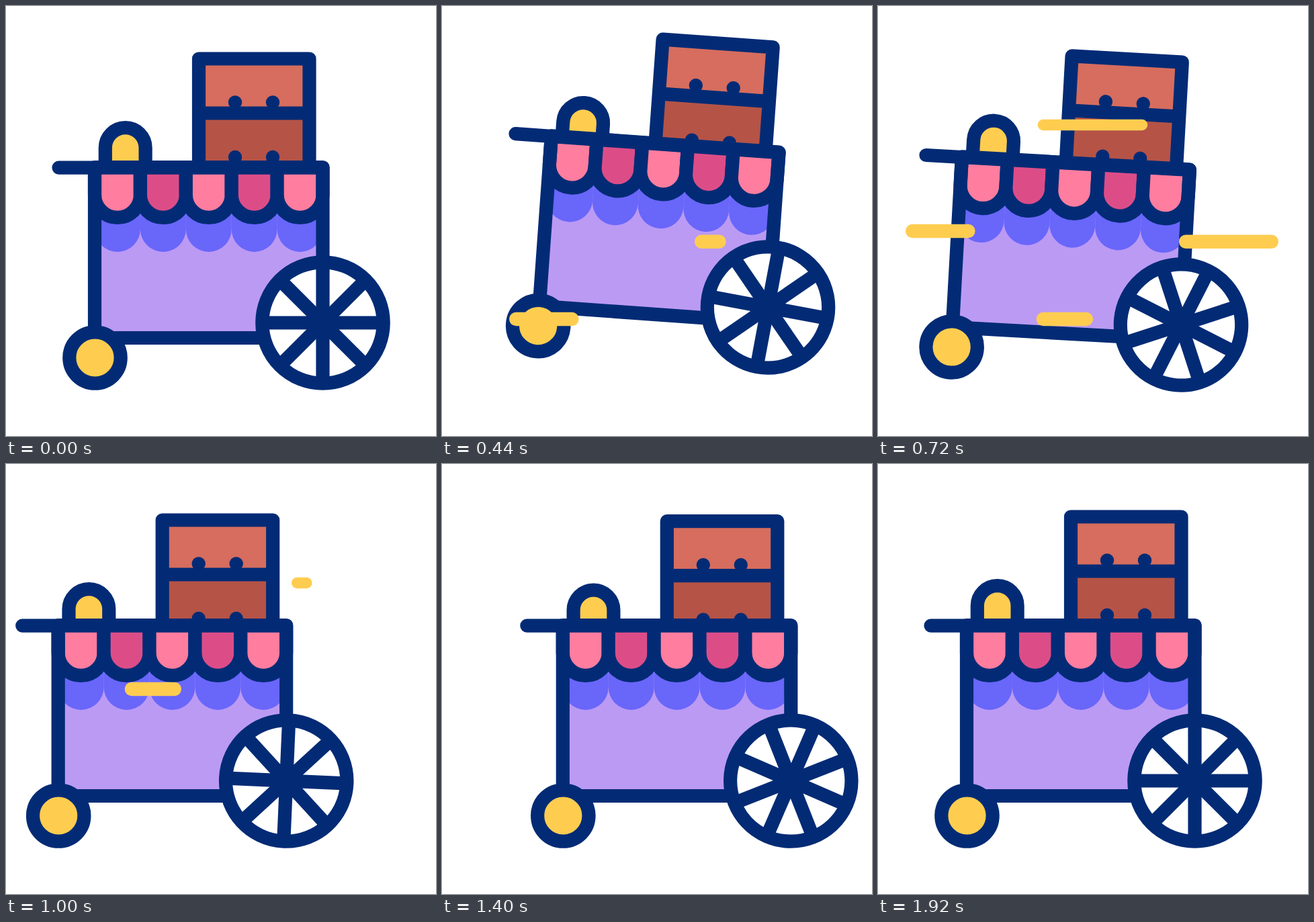
These frames come from a looping animation (640x640 px, 2000 ms). An HTML page:

```html
<!DOCTYPE html>
<html lang="en">
<head>
<meta charset="utf-8">
<title>Rolling cart</title>
<style>
  html, body { margin: 0; width: 100%; height: 100%; overflow: hidden; background: #fff; }
  svg { display: block; width: 100vw; height: 100vh; }
  .line { stroke: #032b75; stroke-width: 20.2; stroke-linecap: round; stroke-linejoin: round; }
  .butt { stroke-linecap: butt; }
  .none { fill: none; }
  .navy { fill: #032b75; }
  .yellow { fill: #fecd50; }
  .dash { stroke: #fecd50; stroke-linecap: round; }
</style>
</head>
<body>
<svg viewBox="0 0 640 640">
  <g id="cart">
    <g id="load">
      <path fill="#d66d5e" d="M287 78.5H451.5V160H287Z"/>
      <path fill="#b55347" d="M287 160H451.5V241H287Z"/>
      <g class="navy">
        <circle cx="341" cy="143.5" r="10.2"/><circle cx="397" cy="143.5" r="10.2"/>
        <circle cx="341" cy="225" r="10.2"/><circle cx="397" cy="225" r="10.2"/>
      </g>
      <path class="line none butt" d="M287 241V78.5H451.5V241M287 159.5H451.5"/>
      <path class="line yellow butt" d="M147.8 241V211A29.9 29.9 0 0 1 207.6 211V241"/>
    </g>
    <path fill="#bb9af4" d="M132 240.6H471.5V494H132Z"/>
    <g id="shade" fill="#6966fa"></g>
    <g id="awning"></g>
    <path class="line none" d="M78.5 240.6H471.5V440M132 240.6V494H440"/>
    <circle class="line yellow" cx="132.5" cy="523.5" r="38.2"/>
    <g id="wheel">
      <circle class="line" fill="#fff" cx="471.5" cy="471.5" r="90.2"/>
    </g>
  </g>
  <g id="wind"></g>
</svg>
<script>
const $ = id => document.getElementById(id);
const HUB = 471.5, LOOP = 2000, STEP = 40, LAST = 1920;

function add(parent, tag, attrs) {
  const el = document.createElementNS('http://www.w3.org/2000/svg', tag);
  for (const k in attrs) el.setAttribute(k, attrs[k]);
  return parent.appendChild(el);
}

// Awning flaps and their shadow
for (let i = 0; i < 5; i++) {
  const x = 132 + 67.9 * i, flap = y => `M${x} 240V${y}a33.95 33.95 0 0 0 67.9 0V240Z`;
  add($('shade'), 'path', { d: flap(332) });
  add($('awning'), 'path', { d: flap(281), class: 'line', fill: i % 2 ? '#dc4d88' : '#ff7d9f' });
}
for (let a = 0; a < 180; a += 45) {
  add($('wheel'), 'path', {
    d: `M${HUB - 88} ${HUB}h176`, class: 'line butt', transform: `rotate(${a} ${HUB} ${HUB})`
  });
}

// Smooth curve through [time, value] keys, flat at every turning point
function curve(keys) {
  const rate = keys.slice(1).map((k, i) => (k[1] - keys[i][1]) / (k[0] - keys[i][0]));
  const slope = keys.map((k, i) => {
    const a = rate[i - 1] || 0, b = rate[i] || 0;
    return a * b > 0 ? 2 * a * b / (a + b) : 0;
  });
  return t => {
    if (t >= keys[keys.length - 1][0]) return keys[keys.length - 1][1];
    let i = 0;
    while (t >= keys[i + 1][0]) i++;
    const [t0, v0] = keys[i], [t1, v1] = keys[i + 1], h = t1 - t0, s = (t - t0) / h, r = 1 - s;
    return v0 * r * r * (1 + 2 * s) + v1 * s * s * (3 - 2 * s)
      + h * s * r * (slope[i] * r - slope[i + 1] * s);
  };
}

const shiftX = curve([[0, 0], [160, 9], [320, 18.3], [440, 13.5], [720, -20.5], [985, -55], [1120, -23], [1335, 49.5], [1920, 0]]);
const shiftY = curve([[0, 0], [160, -21], [310, -37], [440, -23], [590, 3.3], [720, 3], [980, 0]]);
const tilt = curve([[0, 0], [160, 3.2], [310, 4.3], [440, 4.1], [720, 3.2], [980, 0]]);
const spin = curve([[0, 0], [160, 13.8], [440, 83.5], [720, 156.2], [1000, 222.5], [1400, 291.5], [1920, 360]]);
const bob = curve([[0, 0], [160, 7], [310, 0.5], [440, 6.3], [480, 7], [650, 0.5], [720, 2.6], [800, 7],
  [930, 0], [1000, 5], [1080, 7], [1260, 0], [1400, 6.6], [1440, 7], [1600, 0], [1760, 7], [1920, 0]]);

// Wind streaks: left edge, height, thickness, start time
const GROW = 360, LAG = 216;
const streaks = [[100, 466, 20.4, 280], [376, 350.7, 20.4, 358], [235.5, 177, 16.4, 482], [41, 335, 20.4, 560]]
  .map(([x, y, w, start]) => ({
    x, y, w, start, el: add($('wind'), 'path', { class: 'dash', 'stroke-width': w })
  }));

function ease(t) {
  const s = Math.min(1, Math.max(0, t));
  return s * s * (3 - 2 * s);
}

function draw(t) {
  $('cart').setAttribute('transform',
    `translate(${shiftX(t)} ${shiftY(t)}) rotate(${tilt(t)} ${HUB} ${HUB})`);
  $('load').setAttribute('transform', `translate(0 ${bob(t)})`);
  $('wheel').setAttribute('transform', `rotate(${-spin(t)} ${HUB} ${HUB})`);
  for (const { x, y, w, start, el } of streaks) {
    const head = ease((t - start) / GROW), tail = ease((t - start - LAG) / GROW);
    const left = x + w / 2, span = 220 - w;
    el.setAttribute('d', head > tail ? `M${left + span * tail} ${y}H${left + span * head}` : '');
  }
}

const begin = performance.now();
function tick() {
  const t = (performance.now() - begin) % LOOP;
  draw(Math.min(LAST, Math.floor(t / STEP) * STEP));
  requestAnimationFrame(tick);
}
tick();
</script>
</body>
</html>
```
